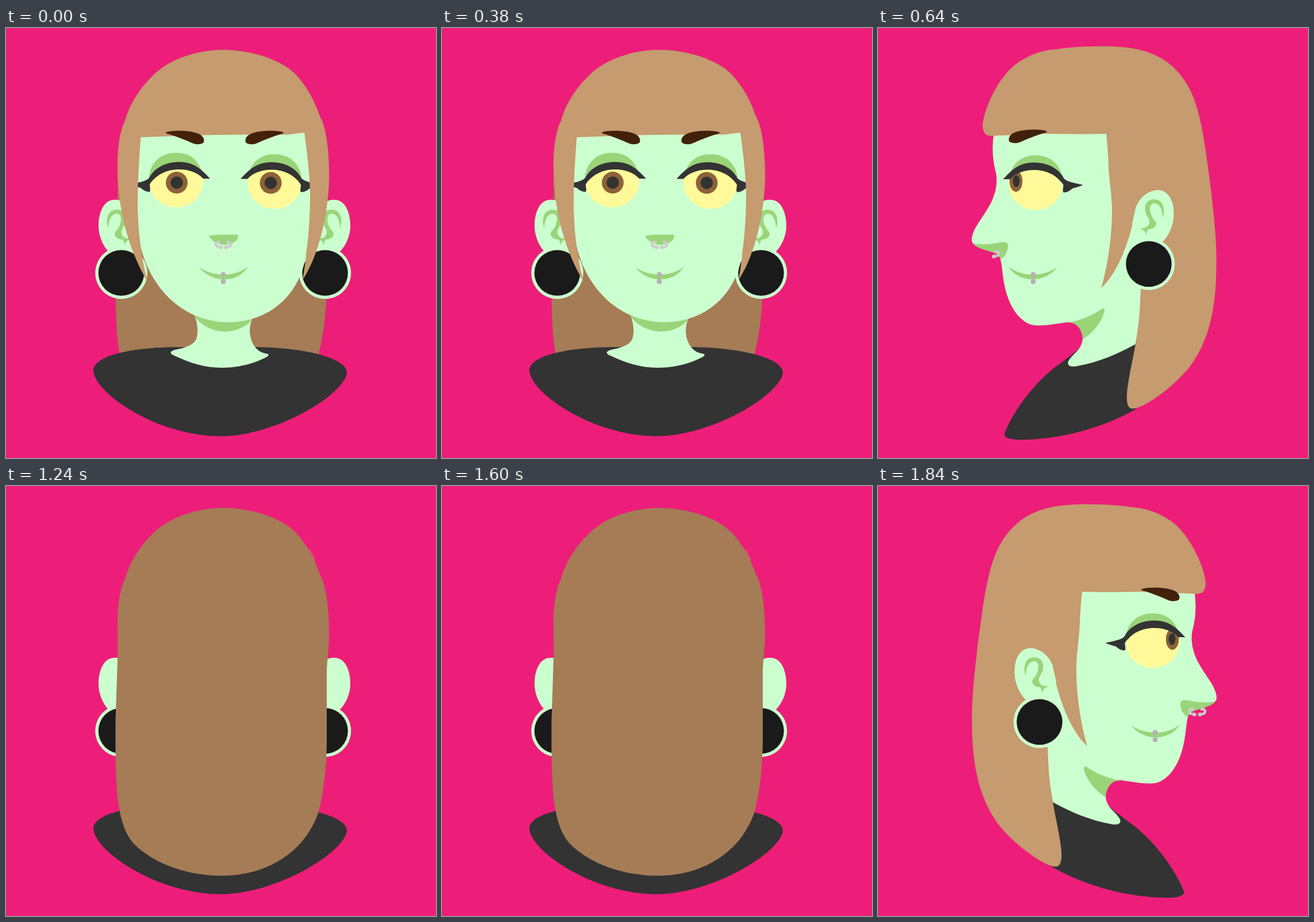
Animation, 748 px wide and 748 px high, one loop 2.44 s. Source, as an HTML page:

```html
<!DOCTYPE html>
<html lang="en">
<head>
<meta charset="utf-8">
<title>Turning head</title>
<style>
  html, body { margin: 0; width: 100%; height: 100%; overflow: hidden; background: #ed1e79; }
  svg { display: block; width: 100%; height: 100%; overflow: hidden; }
  .skin { fill: #ccffcf; }
  .shade { fill: #9ad479; }
  .hair { fill: #c59b6f; }
  .back { fill: #a57c56; }
  .dark { fill: #333; }
  .plug { fill: #1a1a1a; }
  .brow { fill: #42210b; }
  .white { fill: #fff999; }
  .iris { fill: #8c6239; }
  .stud { fill: #b3b3b3; }
  .hoop { fill: none; stroke: #ccc; stroke-width: 4.5; stroke-linecap: round; }

  /* four poses in a row, one visible at a time */
  #strip { animation: turn 2440ms step-end infinite; }
  @keyframes turn {
    0% { transform: translateX(0); }
    26.2295% { transform: translateX(-1000px); }
    50.8196% { transform: translateX(-2000px); }
    75.4098% { transform: translateX(-3000px); }
    100% { transform: translateX(-3000px); }
  }
</style>
</head>
<body>
<svg viewBox="0 0 748 748">
  <defs>
    <path id="concha" class="shade" d="M257 331C252 318 254 298 272 298C286 298 291 312 285 325C281 332 278 335 281 342C284 348 291 349 298 348C293 350 289 352 288 354Q286 357 285 360Q285 354 282 350C276 350 269 347 268 341C268 335 273 334 276 327C280 318 281 306 272 305C262 305 257 317 257 331Z"/>

    <g id="ball">
      <path class="shade" d="M248 264C250 233 270 217 296 217C318 217 334 229 340 248Z"/>
      <path class="white" d="M249 272C258 248 280 240 300 240C320 240 335 248 343 260C345 290 323 312 296 312C272 312 253 296 249 272Z"/>
    </g>
    <path id="lash" class="dark" d="M216 272C230 269 243 267 249 261C258 243 278 233 302 233C328 233 341 247 355 262L343 262C334 252 319 246 301 246C279 246 260 256 250 272C250 278 252 281 250 285C243 285.500 238 281 234 278C228 276 222 275 216 272Z"/>
    <path id="brow" class="brow" d="M278 181.500C284 178 316 177 331 182.500C342 186 346 192 344 199C340 203 332 203 326 201C312 195 296 188 279 183.500Z"/>

    <g id="hoop">
      <path class="hoop" d="M371 372.500C363 371 362 382 374 381"/>
      <circle cx="374" cy="381.500" r="3.300" fill="#ccc"/>
    </g>
    <g id="mouth">
      <path class="shade" d="M336 416C356 431 395 436 421 415C405 443 359 446 336 416Z"/>
      <path d="M378 429V441" stroke="#b3b3b3" stroke-width="2"/>
      <circle class="stud" cx="378" cy="429" r="4.500"/>
      <circle class="stud" cx="378" cy="441" r="4.500"/>
    </g>

    <g id="ears">
      <path class="skin" d="M210 306C200 298 188 297 179 301C166 308 161 327 161 344C161 361 168 378 179 390H230V320Z"/>
      <path class="skin" d="M550 306C560 298 572 297 581 301C594 308 599 327 599 344C599 362 591 379 580 390H530V320Z"/>
      <circle class="skin" cx="200.500" cy="426" r="45.200"/>
      <circle class="plug" cx="200.500" cy="426" r="39.800"/>
      <circle class="skin" cx="555" cy="426" r="45.200"/>
      <circle class="plug" cx="555" cy="426" r="39.800"/>
    </g>
    <path id="shirt" class="dark" d="M152 595C153 572 210 555.500 300 555H430C510 555 593 572 593 600C588 638 470 710 373 710C262 710 152 634 152 595Z"/>
    <path id="back" class="back" d="M376 38C430 38 482 57 505 82C525 104 538 130 546 154C557 172 562 215 562 255C562 285 558 305 558 325V440C558 480 554 530 543 569C518 640 450 678 376 678C320 678 260 660 222 622C208 606 202 586 198 567C192 540 190 490 190.500 410L194.500 285L194 240C194 210 198 178 207 162C215 132 235 100 264 75C290 54 330 39 376 38Z"/>

    <!-- side view, looking right -->
    <g id="side">
      <path class="dark" d="M300 540L400 555C412 567 424 575 437 585C476 612 517 665 532 705C534 714 518 717 495 716C420 714 350 690 302 662Z"/>
      <path class="skin" d="M300 180H550C554 205 553 228 548 247C542 268 548 293 560 312C572 333 588 350 589 367C589 374 586 376 580 379C562 386 544 388 539 402C536 415 536 425 534 436C529 471 515 502 491 514C477 521 452 516 424 512C406 510 396 525 396 541C398 561 415 567 421 580C424 589 414 590 405 588C370 582 335 567 304 550L288 455Z"/>
      <path class="shade" d="M362 488C374 497 396 508 422 512.500C406 511 397 525 396 541C379 532 360 508 358 491Q359 487 362 488Z"/>
      <use href="#ball" x="182" y="4.500"/>
      <ellipse class="iris" cx="512" cy="266.500" rx="11.200" ry="18.500"/>
      <ellipse class="dark" cx="511.500" cy="266.500" rx="6" ry="10.300"/>
      <use href="#lash" x="179.500" y="1"/>
      <path class="hair" d="M355 184Q410 185 460 184L552 187.500C566 189 570 181 570 167C567 140 545 90 515 65C495 49 470 39 443 37C405 31 352 31 330 33C270 37 232 62 208 110C187 155 181 225 173 280C167 335 163 370 163.500 415C164 500 182 559 219 600C250 634 294 663 310 662C320 661 320 645 318.500 630C315 598 304 560 299 515C296 490 296 470 295 453L290 400L303 308C308 350 330 422 364 452.500C353 415 345 365 345 318C345 290 350 268 351 240Q352 210 355 184Z"/>
      <use href="#brow" x="180" y="-2"/>
      <path class="skin" d="M304 314C298 294 280 281 263 282C245 284 237 303 237.500 325C238 345 247 362 257 372L300 400L310 340Z"/>
      <use href="#concha"/>
      <circle class="skin" cx="281" cy="410.500" r="45.200"/>
      <circle class="plug" cx="281" cy="410.500" r="39.800"/>
      <path class="shade" d="M526 379C526 371 534 372 545 374C560 377 575 377 587 375C580 384 560 387 548 392Q541 396 539 402C531 398 526 389 526 379Z"/>
      <use href="#hoop" x="176.500" y="16"/>
      <use href="#mouth" x="104"/>
    </g>
  </defs>

  <g id="strip">
    <g>
      <use href="#back"/>
      <use href="#ears"/>
      <use href="#concha" x="-79" y="18"/>
      <use href="#concha" transform="translate(838 18) scale(-1 1)"/>
      <use href="#shirt"/>
      <path class="skin" d="M324 490C334 511 335 530 331 541C326 552 313 556 293 560C284 563 285 567 293 570C318 582 345 591 375 591C405 591 430 584 452 573C460 569 457 567 451 566C434 563 424 545 424 526Q424 516 430 500Z"/>
      <path class="shade" d="M325 495H429L426 510C414 521 400 528 382 528C360 528 341 518 329 503Z"/>
      <path class="skin" d="M226 175H525C532 250 533 330 521 400C508 467 457 512 384 512C300 509 248 445 233 375C221 310 222 240 226 175Z"/>
      <use href="#ball"/>
      <use href="#ball" transform="translate(763 2.500) scale(-1 1)"/>
      <circle class="iris" cx="297" cy="269" r="19"/>
      <circle class="dark" cx="297" cy="269" r="10.700"/>
      <circle class="iris" cx="460.500" cy="269.500" r="19"/>
      <circle class="dark" cx="460.500" cy="269.500" r="10.700"/>
      <use href="#lash"/>
      <use href="#lash" transform="translate(763 .5) scale(-1 1)"/>
      <path class="hair" d="M376 38C430 38 482 57 505 82C525 104 538 130 546 154C557 172 562 215 562 255C562 310 548 390 516 438C523 400 529 345 529 290C529 260 523 210 519 182L490 185.500Q380 185 340 186.500L234.500 190C232 220 229 268 229 310C230 360 237 410 247 443C210 380 194 310 194 240C194 210 198 178 207 162C215 132 235 100 264 75C290 54 330 39 376 38Z"/>
      <use href="#brow"/>
      <use href="#brow" transform="translate(761 0) scale(-1 1)"/>
      <path class="shade" d="M353 362C365 358 388 360 403 359.500C407 367 396 377 379 377C366 376 358 370 353 362Z"/>
      <use href="#hoop"/>
      <use href="#hoop" transform="translate(756.500 0) scale(-1 1)"/>
      <use href="#mouth"/>
    </g>

    <use href="#side" transform="translate(1752 0) scale(-1 1)"/>

    <g transform="translate(2000 0)">
      <use href="#shirt"/>
      <use href="#ears"/>
      <use href="#back"/>
      <path d="M527 110Q534 119 537 130" fill="none" stroke="#c59b6f"/>
    </g>

    <g transform="translate(3000 0)">
      <use href="#side"/>
      <use href="#hoop" transform="translate(934 16) scale(-1 1)"/>
    </g>
  </g>
</svg>
</body>
</html>
```
